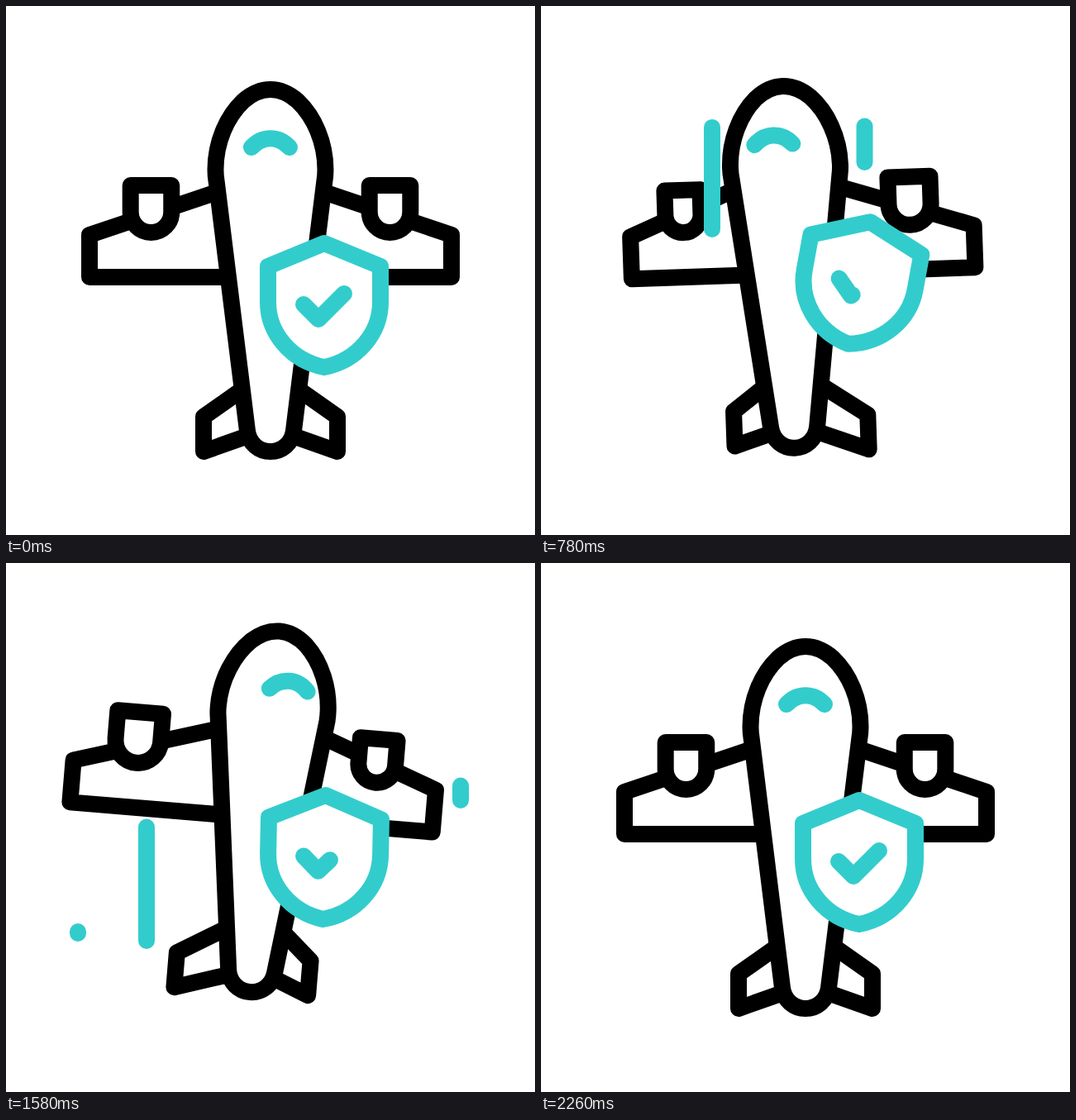
Animation of 640 by 640 pixels, one loop 2400 ms. Source, as an HTML page:

```html
<!DOCTYPE html>
<html lang="en">
<head>
<meta charset="utf-8">
<title>Safe flight</title>
<style>
  html, body { margin: 0; width: 100%; height: 100%; overflow: hidden; background: #fff; }
  svg { display: block; width: 100vw; height: 100vh; }
  path { fill: #fff; stroke: #000; stroke-width: 20; stroke-linecap: round; stroke-linejoin: round; }
  .teal { stroke: #3cc; }
  .open { fill: none; }
</style>
</head>
<body>
<svg viewBox="0 0 640 640">
  <g id="plane">
    <path id="wingL" class="open"/>
    <path id="wingR" class="open"/>
    <path id="tailL" class="open"/>
    <path id="tailR" class="open"/>
    <path id="engineL"/>
    <path id="engineR"/>
    <path d="M0-219C-14-219-24-213-33-205C-53-186-66.500-155-66.500-122Q-66.500-115-65.500-109L-28 194C-26 209-14 219 0 219S26 209 28 194L65.500-109Q66.500-115 66.500-122C66.500-155 53-186 33-205C24-213 14-219 0-219Z"/>
    <path id="screen" class="teal open" d="M-23-149C-10-163.500 10-163.500 23-149"/>
  </g>
  <g id="streaks"></g>
  <g id="shield">
    <path class="teal" d="M0-75L68-47V-4C68 34 40 67 0 75C-40 67-68 34-68-4V-47Z"/>
    <path id="check" class="teal open"/>
  </g>
</svg>
<script>
const LOOP = 2400, FLIGHT = 2260;
const el = id => document.getElementById(id);
const put = (id, attr, value) => el(id).setAttribute(attr, value);
const clamp = v => Math.max(0, Math.min(1, v));
const smooth = v => { const u = clamp(v); return u * u * (3 - 2 * u); };

// Sum of standing waves: every motion starts and ends at rest position.
const wave = (u, ...amps) =>
  amps.reduce((sum, a, k) => sum + a * Math.sin((k + 1) * Math.PI * u), 0);

// Turning points of the shield: time, drop, tilt
const swing = [
  [0, 0, 0], [380, 54, -17], [780, -27, 10.3], [1220, 23, -5.7],
  [1580, -6, 1.2], [1820, 16, 3], [FLIGHT, 0, 0]
];

// x, top, start time, length
const streaks = [
  [69, 111, 10, 190], [550, 206, 10, 171], [391.5, 40, 248, 149], [207, 70, 336],
  [499, 200, 840], [87, 248, 928], [550, 87, 978], [170, 257, 1156]
].map(([x, top, start, length = 200]) => {
  const path = document.createElementNS('http://www.w3.org/2000/svg', 'path');
  path.setAttribute('class', 'teal open');
  el('streaks').append(path);
  return { x, top, start, length, path };
});

// side is -1 for left, 1 for right
function drawSide(side, roll, span, bank) {
  const name = side < 0 ? 'L' : 'R';
  const tip = 219 + span + side * bank;
  put('wing' + name, 'd', `M${side * 60}-96.500L${side * tip}-43V8H${side * 50}`);

  const eng = 0.66 * tip - side * 0.25 * Math.max(0, roll);
  const r = eng * 0.1715, c = side * eng, low = -46;
  const top = low - 57 - 0.3 * (eng - 144.5);
  put('engine' + name, 'd',
    `M${c - r} ${top}H${c + r}V${low - r}A${r} ${r} 0 0 1 ${c - r} ${low - r}Z`);

  const x = side * 81 - 0.65 * roll;
  const lift = roll * (roll < 0 ? 0.35 : 0.1) * -side;
  put('tail' + name, 'd',
    `M${side * 37} 146L${x} ${177 + lift}V${219 + lift}L${side * 30} 201`);
}

function drawPlane(u) {
  const x = 320 + wave(u, -17, -6, 3.5);
  const y = 320 + wave(u, -13.5, 10, 4);
  const tilt = wave(u, 1.6, -3.2, -0.3, 0.8);
  const roll = wave(u, 2, -14, -2.4, 4);
  const span = wave(u, -6.5, -6.5);
  const bank = roll * (0.013 * roll - 1.17);
  put('plane', 'transform', `translate(${x} ${y}) rotate(${tilt})`);
  put('screen', 'transform', `translate(${roll} 0)`);
  drawSide(-1, roll, span, bank);
  drawSide(1, roll, span, bank);
}

function drawShield(t) {
  const i = Math.max(1, swing.findIndex(k => k[0] >= t));
  const [t0, y0, a0] = swing[i - 1], [t1, y1, a1] = swing[i];
  const e = smooth((t - t0) / (t1 - t0));
  put('shield', 'transform',
    `translate(385 ${362 + y0 + (y1 - y0) * e}) rotate(${a0 + (a1 - a0) * e})`);
}

function drawCheck(t) {
  const part = t < 1100 ? 1 - clamp((t - 600) / 300) : clamp((t - 1320) / 400);
  const len = part * (18 + 31);
  const a = Math.min(18, len), b = Math.max(0, len - 18);
  put('check', 'd', part > 0 ? `M-25-1l${a} ${a}l${b} ${-b}` : '');
}

function drawStreak({ x, top, start, length, path }, t) {
  const head = smooth((t - start) / 400), tail = smooth((t - start - 276) / 400);
  const shown = head > 0.001 && tail < 1;
  path.setAttribute('d',
    shown ? `M${x} ${top + length * tail}v${length * (head - tail) + 0.01}` : '');
}

function draw(time) {
  const t = Math.min(time, FLIGHT);
  drawPlane(t / FLIGHT);
  drawShield(t);
  drawCheck(t);
  streaks.forEach(s => drawStreak(s, t));
}

const begin = performance.now();
function tick() {
  draw((performance.now() - begin) % LOOP);
  requestAnimationFrame(tick);
}
draw(0);
requestAnimationFrame(tick);
</script>
</body>
</html>
```
